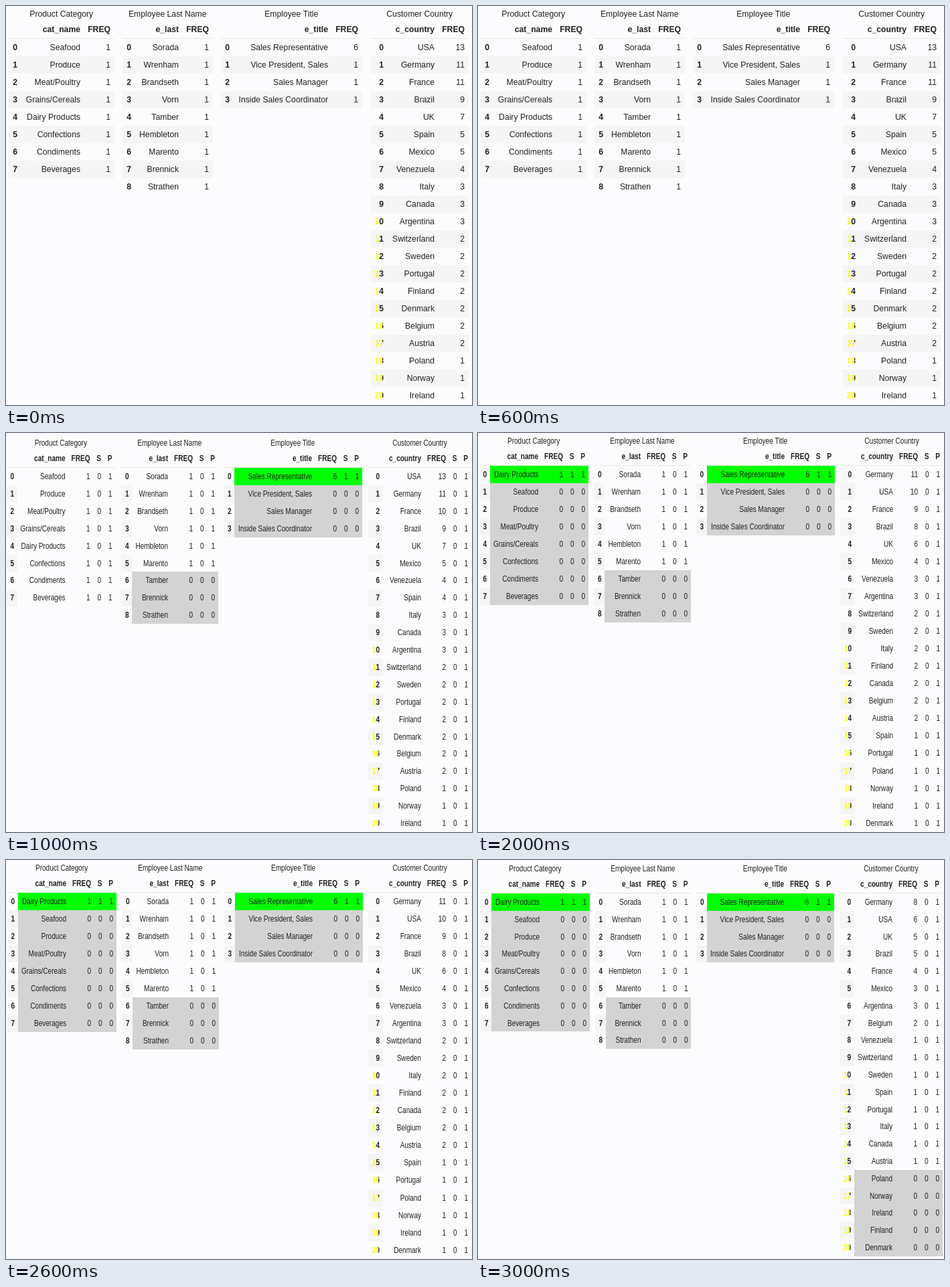
An HTML page with a canvas that plays this animation: 696 by 596 pixels, repeating every 4 s.

```html
<!DOCTYPE html>
<html lang="en">
<head>
<meta charset="utf-8">
<title>Frequency tables</title>
<style>
html, body { margin: 0; width: 100%; height: 100%; overflow: hidden; background: #fcfcfe; }
canvas { display: block; }
</style>
</head>
<body>
<canvas id="stage" width="696" height="596"></canvas>
<script>
const ctx = document.getElementById("stage").getContext("2d");
const FONT = "12.2px 'Liberation Sans', Arial, sans-serif";
const INK = "#212121", STRIPE = "#f5f5f5", GREY = "#d3d3d3";
const TABLES = [
  ["Product Category", "cat_name"],
  ["Employee Last Name", "e_last"],
  ["Employee Title", "e_title"],
  ["Customer Country", "c_country"]
];

// "Name 3,Name,..." -> rows; a missing count repeats the previous one
function parse(list) {
  let n = 1;
  return list.split(",").map(item => {
    const [, name, count] = item.match(/^(.*?)(?: (\d+))?$/);
    if (count) n = +count;
    return { name, n };
  });
}

const jobs = rest => [
  { name: "Sales Representative", n: 6 },
  ...["Vice President, Sales", "Sales Manager", "Inside Sales Coordinator"].map(name => ({ name, n: rest }))
];
const goods = parse("Seafood,Produce,Meat/Poultry,Grains/Cereals,Dairy Products,Confections,Condiments,Beverages");
const dairy = parse("Dairy Products 1,Seafood 0,Produce,Meat/Poultry,Grains/Cereals,Confections,Condiments,Beverages");
const staff = parse("Sorada,Wrenham,Brandseth,Vorn,Tamber,Hembleton,Marento,Brennick,Strathen");
const team = parse("Sorada,Wrenham,Brandseth,Vorn,Hembleton,Marento,Tamber 0,Brennick,Strathen");

// y: centre of the first row; cols: right edges of index and name in each table
const SCENES = [
  { y: 62, step: 26, sx: 1, cols: [[17, 111], [187, 258], [334, 481], [564, 640]],
    data: [goods, staff, jobs(1), parse("USA 13,Germany 11,France,Brazil 9,UK 7,Spain 5,Mexico,Venezuela 4,Italy 3,Canada,Argentina,Switzerland 2,Sweden,Portugal,Finland,Denmark,Belgium,Austria,Poland 1,Norway,Ireland")] },
  { y: 65, step: 25.9, sx: .825, cols: [[12, 88.5], [183.5, 242], [336.5, 457], [558, 620]],
    data: [goods, team, jobs(0), parse("USA 13,Germany 11,France 10,Brazil 9,UK 7,Mexico 5,Venezuela 4,Spain,Italy 3,Canada,Argentina,Switzerland 2,Sweden,Portugal,Finland,Denmark,Belgium,Austria,Poland 1,Norway,Ireland")] },
  { y: 62, step: 26.03, sx: .825, cols: [[13, 90], [184.5, 243], [337, 458], [558, 620]],
    data: [dairy, team, jobs(0), parse("Germany 11,USA 10,France 9,Brazil 8,UK 6,Mexico 4,Venezuela 3,Argentina,Switzerland 2,Sweden,Italy,Finland,Canada,Belgium,Austria,Spain 1,Portugal,Poland,Norway,Ireland,Denmark")] },
  { y: 63, step: 25.8, sx: .825, cols: [[15.5, 92], [186, 243.5], [337.5, 457], [557, 619]],
    data: [dairy, team, jobs(0), parse("Germany 8,USA 6,UK 5,Brazil,France 4,Mexico 3,Argentina,Belgium 2,Venezuela 1,Switzerland,Sweden,Spain,Portugal,Italy,Canada,Austria,Poland 0,Norway,Ireland,Finland,Denmark")] }
];

function text(str, x, y, sx, { bold = false, align = "right", fill = INK } = {}) {
  ctx.save();
  ctx.translate(x, Math.round(y + 4));
  ctx.scale(sx, 1);
  ctx.font = (bold ? "bold " : "") + FONT;
  ctx.textAlign = align;
  ctx.fillStyle = fill;
  ctx.fillText(str, 0, 0);
  ctx.restore();
}

// Filled box with its edges on whole pixels
function box(...args) {
  const fill = args.pop();
  const [x0, y0, x1, y1] = args.map(Math.round);
  ctx.fillStyle = fill;
  ctx.fillRect(x0, y0, x1 - x0, y1 - y0);
}

// Two-digit row numbers are yellow on the left and dark on the right
function indexFill(i) {
  if (i < 10) return INK;
  const edge = i < 16 ? .52 : .85;
  const g = ctx.createLinearGradient(-14, 0, 0, 0);
  g.addColorStop(edge, "#ff0");
  g.addColorStop(edge, INK);
  return g;
}

function drawTable({ y, step, sx, cols }, t, rows) {
  const wide = sx === 1;
  const [index, name] = cols[t];
  const edges = wide ? [45] : [37, 53.5, 70];
  const left = index - (t === 3 ? 19 : 13) * (wide ? 1 : .87);
  const right = name + (wide ? 50.5 : 74.5);
  const cell = index + 4.8;
  const [title, head] = TABLES[t];
  const bold = { bold: true };

  text(title, (left + right) / 2, y - 50, sx, { align: "center" });
  text(head, name, y - 27, sx, bold);
  edges.forEach((dx, k) => text(["FREQ", "S", "P"][k], name + dx, y - 27, sx, bold));
  box(left, y - 14, right, y - 13, "#e8e8dc");

  rows.forEach((row, i) => {
    const mid = y + i * step;
    const top = mid - 13, bottom = top + step;
    const chosen = !wide && i === 0 && rows[1].n === 0;
    if (i % 2) box(left, top, wide ? right : cell, bottom, STRIPE);
    if (chosen) box(cell, top, right, bottom, "#0f0");
    if (!row.n) box(cell, top, right, bottom, GREY);
    text(i, index, mid, sx, { bold: true, fill: indexFill(i) });
    text(row.name, name, mid, sx);
    const values = [row.n, +chosen, +(row.n > 0)];
    edges.forEach((dx, k) => text(values[k], name + dx, mid, sx));
  });
}

let shown = -1;
const start = performance.now();
function tick() {
  const now = Math.floor((performance.now() - start) / 1000) % SCENES.length;
  if (now !== shown) {
    shown = now;
    const scene = SCENES[now];
    box(0, 0, 696, 596, "#fcfcfe");
    scene.data.forEach((rows, t) => drawTable(scene, t, rows));
  }
  requestAnimationFrame(tick);
}
tick();
</script>
</body>
</html>
```
